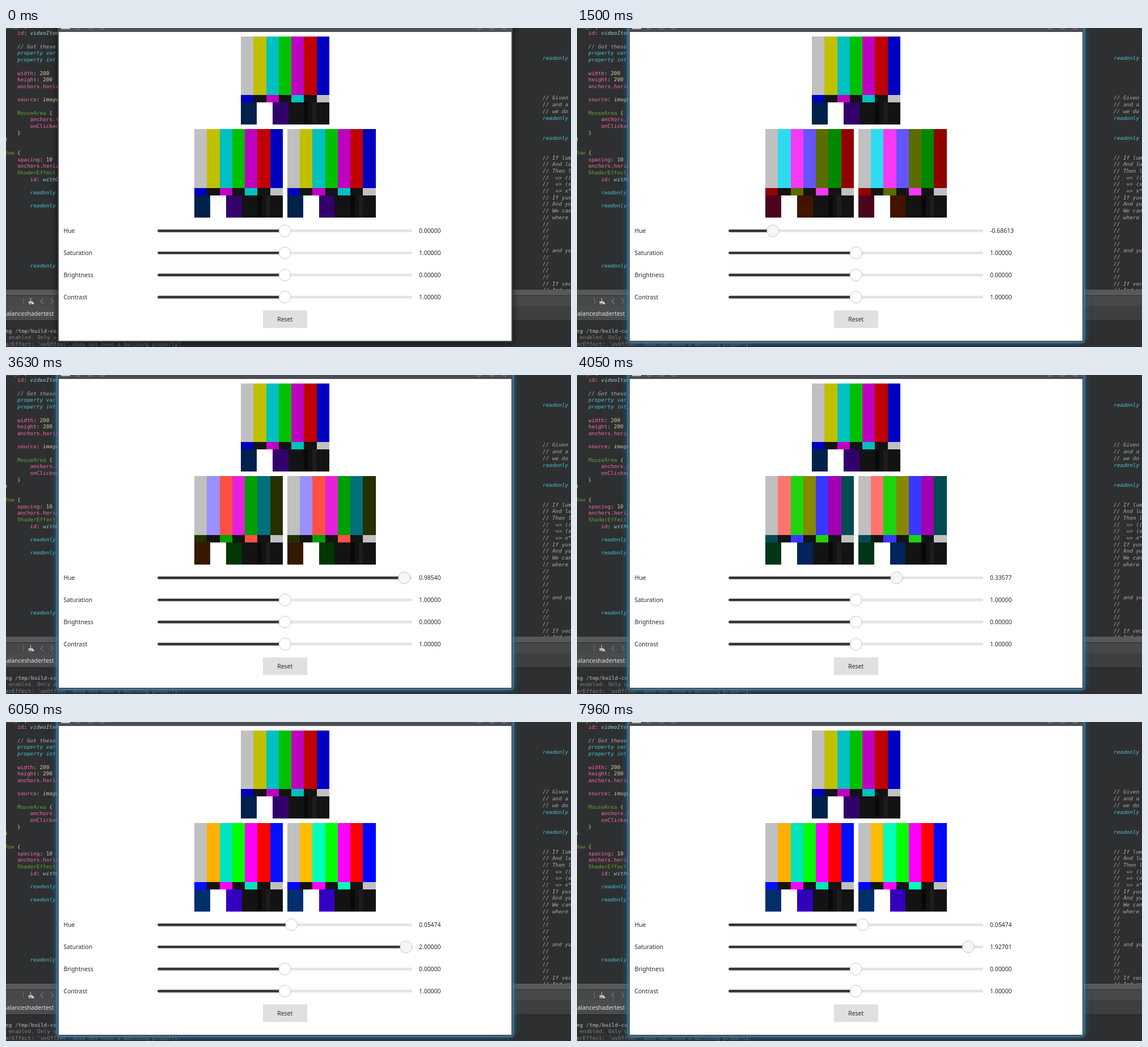
Recreate the animation shown at these times as an HTML page. Size 996 px wide and 562 px high, loop 8000 ms.

```html
<!DOCTYPE html>
<html lang="en">
<head>
<meta charset="utf-8">
<title>Video balance shader</title>
<style>
  html, body { margin: 0; width: 100%; height: 100%; overflow: hidden; background: #2e2f30; }
  #stage { position: relative; width: 996px; height: 562px; overflow: hidden; }
  svg { position: absolute; left: 0; top: 0; }
  text { white-space: pre; }
  .mono { font: 9.36px "DejaVu Sans Mono", monospace; fill: #d6cf9a; }
  .ui { font: 10.4px "Noto Sans", sans-serif; fill: #26282a; }
  .comment { fill: #a8abb0; font-style: italic; }
  .key { fill: #45c6d6; font-style: italic; }
  .prop { fill: #ff6aad; }
  .type { fill: #66a334; }
  .id { fill: #9acfd6; font-style: italic; }
  .ref { font-style: italic; }
  .log { fill: #7d7e80; }
  .bold { font-weight: bold; fill: #929395; }
  .frame { position: absolute; left: 91px; top: -30px; width: 802px; height: 583px; border-radius: 3px; }
  #shadow { background: #505356; box-shadow: 0 2px 12px 1px rgba(0, 0, 0, .6); }
  #glow { opacity: 0; background: #4a4e52; box-shadow: 0 0 4px 1px #4fa6dc, 0 0 13px 2px rgba(50, 140, 205, .65); }
</style>
</head>
<body>
<div id="stage">
  <svg width="996" height="562">
    <g id="code"></g>
    <rect y="461" width="996" height="101" fill="#2e2f30"/>
    <rect y="461" width="996" height="10" fill="#58595b"/>
    <rect y="471" width="996" height="1" fill="#2a2b2c"/>
    <rect y="472" width="996" height="18" fill="#464849"/>
    <rect y="490" width="996" height="25" fill="#3d3f41"/>
    <rect y="490" width="91" height="25" fill="#494b4d"/>
    <rect y="515" width="996" height="1" fill="#232425"/>
    <rect x="30" y="475" width="1" height="12" fill="#6b6c6e"/>
    <path d="M43.5 476v5M40 482h7v2h-7zM39.5 486h5M47 483l3 3h-5z" fill="#d0d0d0" stroke="#d0d0d0"/>
    <path d="M65.5 477l-4.500 4.500 4.500 4.500M79 477l4.500 4.500-4.500 4.500" fill="none" stroke="#77797b" stroke-width="1.200"/>
    <text class="ui" x="84.500" y="507" text-anchor="end" style="fill:#e2e2e2">balanceshadertest</text>
    <text class="mono log bold" x="-1" y="536.500">ng /tmp/build-co</text>
    <text class="mono log" x="-1" y="548">&#160;enabled. Only u</text>
    <text class="mono log" x="-1" y="559.500">erEffect: 'uvOffset' does not have a matching property!</text>
  </svg>
  <div id="shadow" class="frame"></div>
  <div id="glow" class="frame"></div>
  <svg width="996" height="562">
    <rect x="93" y="7" width="798" height="544" fill="#fff"/>
    <rect x="97" y="-8" width="16" height="10" fill="#c3c5c7"/>
    <g id="buttons" fill="none" stroke="#8f9294"></g>
    <g id="images" shape-rendering="crispEdges"></g>
    <g id="sliders"></g>
    <rect x="453" y="497.500" width="78" height="31" fill="#e0e0e0"/>
    <text class="ui" x="491.700" y="517" text-anchor="middle">Reset</text>
  </svg>
</div>
<script>
const $ = id => document.getElementById(id);

function add(parent, tag, attrs, html = '') {
  const el = document.createElementNS('http://www.w3.org/2000/svg', tag);
  for (const k in attrs) el.setAttribute(k, attrs[k]);
  el.innerHTML = html;
  parent.append(el);
  return el;
}

// Code panes: "line indent markup", where <class|text> marks a coloured span
const left = `-1 0 <type|Image> {
0 4 <prop|id>: <id|videoItem>
2 4 <comment|// Got these>
3 4 <key|property var>
4 4 <key|property int>
6 4 <prop|width>: 200
7 4 <prop|height>: 200
8 4 <prop|anchors.horiz>
10 4 <prop|source>: <ref|image>
12 4 <type|MouseArea> {
13 8 <prop|anchors.f>
14 8 <prop|onClicked>
15 4 }
16 0 }
18 0 <type|Row> {
19 4 <prop|spacing>: 10
20 4 <prop|anchors.horiz>
21 4 <type|ShaderEffect>
22 8 <prop|id>: <id|withG>
24 8 <key|readonly>
26 8 <key|readonly>
35 8 <key|readonly>`;
const right = ['readonly', , , , , , '// Given', '// and a', '// we do', 'readonly', , , 'readonly', , ,
  '// If lum', '// And lu', '// Then l', '//  => ((', '//  => (x', '//  => x*', '// If yuv',
  '// And yu', '// We can', '// where', '//', '//', '//', '//', '// and yu', '//', '//', '//', '//',
  '// If vec', '// And yuv'];
const lineH = 11.69;

for (const row of left.split('\n')) {
  const [, line, indent, body] = row.match(/^(\S+) (\S+) (.*)$/);
  add($('code'), 'text', { class: 'mono', x: -2.5 + indent * 5.63, y: 12.4 + line * lineH },
    body.replace(/<(\w+)\|([^>]*)>/g, '<tspan class="$1">$2</tspan>'));
}
right.forEach((s, i) => add($('code'), 'text',
  { class: 'mono ' + (s[0] === '/' ? 'comment' : 'key'), x: 946, y: 56.3 + i * lineH },
  s.replace(/>/g, '&gt;')));

for (const x of [127, 149, 170, 834, 856, 878]) add($('buttons'), 'circle', { cx: x, cy: -4, r: 6 });

// Test card on a unit square: x, y, width, height, colour
const C = 192, gray = [C, C, C], blue = [0, 0, C], cyan = [0, C, C], pink = [C, 0, C];
const level = v => [v, v, v], black = level(19);
const card = [];
[gray, [C, C, 0], cyan, [0, C, 0], pink, [C, 0, 0], blue]
  .forEach((c, i) => card.push([i / 7, 0, 1 / 7, 2 / 3, c]));
[blue, black, pink, black, cyan, black, gray]
  .forEach((c, i) => card.push([i / 7, 2 / 3, 1 / 7, 1 / 12, c]));
[[0, 33, 76], level(255), [50, 0, 106], black]
  .forEach((c, i) => card.push([i * 5 / 28, .75, 5 / 28, .25, c]));
[9, 19, 29].forEach((v, i) => card.push([(15 + i) / 21, .75, 1 / 21, .25, level(v)]));
card.push([6 / 7, .75, 1 / 7, .25, black]);

const SIZE = 155.7;
function drawCard(x0, y0) {
  const px = (o, v) => Math.round(o + v * SIZE);
  return card.map(([x, y, w, h, c]) => {
    const l = px(x0, x), t = px(y0, y);
    return add($('images'), 'rect',
      { x: l, y: t, width: px(x0, x + w) - l, height: px(y0, y + h) - t, fill: `rgb(${c})` });
  });
}
drawCard(414.1, 14.6);
const clamped = drawCard(332.2, 178.3), exact = drawCard(496, 178.3);

// Rotate and scale chroma (BT.601); limit caps it like 8-bit video does
function balance([r, g, b], hue, sat, limit) {
  const y = .299 * r + .587 * g + .114 * b;
  const u = (b - y) * .564, v = (r - y) * .713;
  const c = Math.cos(hue * Math.PI), s = Math.sin(hue * Math.PI);
  const cap = n => Math.max(-limit, Math.min(limit, n * sat));
  const u2 = cap(u * c + v * s), v2 = cap(v * c - u * s);
  const out = [y + 1.402 * v2, y - .344 * u2 - .714 * v2, y + 1.772 * u2];
  return `rgb(${out.map(n => Math.max(0, Math.min(255, Math.round(n))))})`;
}

function makeSlider(label, i, base) {
  const y = 357.3 + i * 38.95, g = $('sliders');
  const bar = (w, fill) => add(g, 'rect', { x: 267.2, y: y - 2.35, width: w, height: 4.7, rx: 2.35, fill });
  add(g, 'text', { class: 'ui', x: 101.5, y: y + 3.8 }, label);
  const value = add(g, 'text', { class: 'ui', x: 728, y: y + 3.8 });
  bar(449, '#e4e4e4');
  const fill = bar(0, '#353637');
  const knob = add(g, 'circle', { cy: y, r: 10.5, stroke: '#bdbebf', 'stroke-width': .9 });
  return (v, pressed) => {
    const pos = v - base;
    fill.setAttribute('width', 449 * (pos + 1) / 2);
    knob.setAttribute('cx', 491.7 + 213.5 * pos);
    knob.setAttribute('fill', pressed ? '#f6f6f6' : '#fff');
    value.textContent = v.toFixed(5);
  };
}
const [setHue, setSat, setBright, setContrast] =
  ['Hue', 'Saturation', 'Brightness', 'Contrast'].map((s, i) => makeSlider(s, i, i % 2));
setBright(0);
setContrast(1);

// Drags: first tick, last tick, from, to, easing
const smooth = p => p * p * (3 - 2 * p);
const hueDrags = [
  [15, 24, 0, -1, p => p ** 1.478],
  [33, 45, -1, 1, smooth],
  [86, 97, 1, 92 / 274, smooth],
  [100, 111, 92 / 274, 15 / 274, smooth]
];
const satDrags = [
  [136, 145, 1, 2, smooth],
  [166, 169, 2, 0, smooth],
  [185, 191, 0, 1 + 254 / 274, smooth]
];
function valueAt(drags, tick) {
  let v = drags[0][2];
  for (const [a, b, from, to, ease] of drags)
    if (tick > a) v = from + (to - from) * ease(Math.min(1, (tick - a) / (b - a)));
  return Math.round(v * 274) / 274;
}

const FPS = 24, LOOP = 8000, start = performance.now();
let shown = -1;
function draw() {
  const tick = Math.floor((performance.now() - start) % LOOP * FPS / 1000);
  if (tick !== shown) {
    shown = tick;
    const hue = valueAt(hueDrags, tick), sat = valueAt(satDrags, tick);
    setHue(hue, tick >= 12 && tick < 112);
    setSat(sat, tick >= 132);
    card.forEach((part, i) => {
      clamped[i].setAttribute('fill', balance(part[4], hue, sat, 145.7));
      exact[i].setAttribute('fill', balance(part[4], hue, sat, 1e3));
    });
    $('glow').style.opacity = Math.max(0, Math.min(1, (tick - 11) / 4));
  }
  requestAnimationFrame(draw);
}
draw();
</script>
</body>
</html>
```
